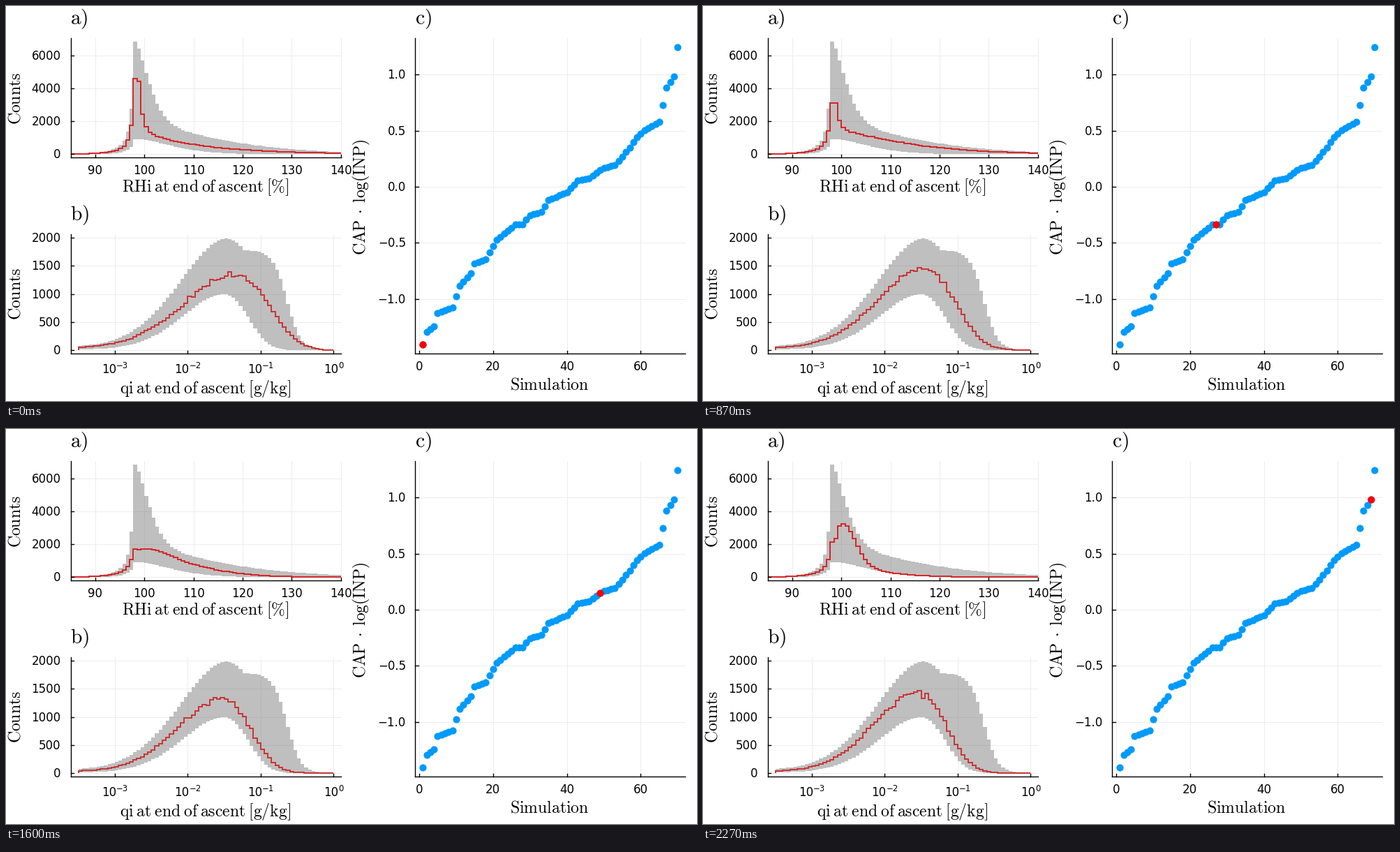
Recreate the animation shown at these times as a matplotlib script. Size 990 px wide and 566 px high, loop 2.34 s.

```python
import numpy as np
import matplotlib.pyplot as plt
from matplotlib.animation import FuncAnimation
from matplotlib.collections import LineCollection

plt.rcParams["mathtext.fontset"] = "cm"
plt.rcParams["font.family"] = "DejaVu Sans"

W, H, DPI = 990, 566, 100
PX = 72 / DPI            # points per pixel
STEPS, TICK_MS, LOOP_MS = 35, 10, 2340

fig = plt.figure(figsize=(W / DPI, H / DPI), dpi=DPI, facecolor="white")
ax = fig.add_axes([0, 0, 1, 1])
ax.set_xlim(0, W)
ax.set_ylim(H, 0)
ax.axis("off")


# ---- scales, all in stage pixels ----
def rh_x(v):
    return 198.3 + 7.03 * (v - 100)


def rh_y(n):
    return 212.2 - 0.02353 * n


def qi_x(e):
    return 469.2 + 104.4 * e


def qi_y(n):
    return 493.2 - 0.0806 * n


def sim_x(s):
    return 592 + 5.29 * s


def cap_y(v):
    return 258.9 - 160.7 * v


# ---- histogram shapes ----
RH_BINS = np.arange(74) - 17.0       # bin 0 is where the spike starts
QI_BINS = np.arange(70.0)


def decay(d, scale, power):
    return np.exp(-(np.maximum(d, 0) / scale) ** power)


def rise(tail, steep, tail_len=3.6):
    """Growth from the left up to the spike."""
    u = np.minimum(RH_BINS + 1, 0)
    return tail * np.exp(u / tail_len) + steep * np.exp(u / 0.8)


def spiked(left, right):
    return np.where(RH_BINS < 0, left, right)


def rh_counts_at(spike, broad, scale, power, hump):
    right = broad * decay(RH_BINS, scale, power)
    right += spike * decay(RH_BINS - 1, 1, 1)
    centre = 6 - hump / 700
    right += hump * np.exp(-((RH_BINS - centre) / 300) ** 2 / 2 * 90 ** 2)
    return spiked(rise(700, 350 + 0.24 * max(spike, 0)), right)


def bell(peak, centre, left, right, base):
    """Skewed bell with its own width on each side and a fading base."""
    shape = decay(centre - QI_BINS, left, 1.85) * decay(QI_BINS - centre, right, 2.4)
    return peak * shape + base * (1 - QI_BINS / 70)


RH_TOP = spiked(rise(1200, 1560),
                4850 * decay(RH_BINS, 5, 1.5) + 2000 * decay(RH_BINS, 27, 1.4))
RH_LOW = spiked(rise(430, 0, 2), 920 * decay(RH_BINS, 13.5, 1.7))
QI_TOP = np.maximum(bell(1960, 40, 18.3, 12.3, 50),
                    np.where(QI_BINS > 40, 1780 / (1 + np.exp((QI_BINS - 56.7) / 1.9)), 0))
QI_LOW = bell(990, 39, 15.7, 9.2, 10)

# how the shapes drift over the loop
KEYS = [0, 5, 10, 16, 21, 28, 34]


def drift(*values):
    return np.interp(np.arange(STEPS), KEYS, values)


spike = drift(3050, 3100, 2350, 820, 150, -200, -1000)
broad = drift(1500, 1400, 1500, 1480, 1620, 1650, 1800)
scale = drift(17, 27, 23.5, 23.5, 20.5, 17, 9)
power = drift(1, 1.2, 1.3, 1.4, 1.9, 1.5, 1.1)
hump = drift(0, 0, 0, 0, 0, 450, 2040)
peak = drift(1330, 1500, 1450, 1400, 1310, 1300, 1430)
centre = drift(42, 41, 41, 38.5, 38, 39, 38)
right = drift(13, 13, 12.2, 12, 11.5, 10.5, 11)

rng = np.random.default_rng(4)


def sampled(curve, low, top, noise):
    grain = 1 + noise * rng.standard_normal(curve.size)
    return np.clip(curve * grain, low, top)


rh_all = [sampled(rh_counts_at(*p), RH_LOW, RH_TOP, 0.01)
          for p in zip(spike, broad, scale, power, hump)]
qi_all = [sampled(bell(p, c, 16.5 + 0.75 * (c - 38), r, 30), QI_LOW, QI_TOP, 0.02)
          for p, c, r in zip(peak, centre, right)]

rh_edges = np.clip(rh_x(85 + 0.75 * np.arange(75)), 92.9, 479.5)
qi_edges = qi_x(-3.5 + 0.05 * np.arange(71))

# sorted score of each simulation, through its main bends
BENDS = [(1, -1.41), (2, -1.295), (4, -1.245), (5, -1.13), (9, -1.075), (11, -0.885),
         (14, -0.77), (15, -0.683), (18, -0.645), (21, -0.475), (26, -0.338),
         (28, -0.335), (30, -0.255), (33, -0.226), (35, -0.12), (40, -0.048),
         (43, 0.054), (46, 0.076), (50, 0.17), (53, 0.19), (57, 0.35), (59, 0.44),
         (61, 0.502), (65, 0.576), (67, 0.882), (69, 0.981), (70, 1.243)]
sims = np.arange(1, 71)
dot_x = sim_x(sims)
dot_y = cap_y(np.interp(sims, *zip(*BENDS)))


# ---- static drawing ----
def stairs(edges, values):
    return np.repeat(edges, 2)[1:-1], np.repeat(values, 2)


def label(x, y, s, size=16.6, **kw):
    kw = {"ha": "center", "va": "baseline", **kw}
    ax.text(x, y, s, fontsize=size * PX, color="black",
            rotation_mode="anchor", **kw)


def signed(s):
    return s.replace("-", "\u2212")


def panel(left, right, top, bottom, xs, ys):
    grid = [[(x, top), (x, bottom)] for x in xs]
    grid += [[(left, y), (right, y)] for y in ys]
    ax.add_collection(LineCollection(grid, colors="#ececec", linewidths=PX, zorder=1))
    axes = [[(x, bottom), (x, bottom - 4.5)] for x in xs]
    axes += [[(left, y), (left + 4.5, y)] for y in ys]
    axes += [[(left, top), (left, bottom)], [(left, bottom), (right, bottom)]]
    ax.add_collection(LineCollection(axes, colors="black", linewidths=1.4 * PX,
                                     capstyle="projecting", zorder=5))


def band(edges, low, top, to_y):
    x, lo = stairs(edges, to_y(low))
    _, hi = stairs(edges, to_y(top))
    ax.fill_between(x, lo, hi, color="#808080", alpha=0.5, linewidth=0, zorder=2)


rh_ticks = range(90, 141, 10)
rh_counts = range(0, 6001, 2000)
panel(92.5, 480, 46, 217, [rh_x(v) for v in rh_ticks], [rh_y(n) for n in rh_counts])
for v in rh_ticks:
    label(rh_x(v), 241, str(v))
for n in rh_counts:
    label(78.5, rh_y(n) + 6, str(n), ha="right")

qi_ticks = range(-3, 1)
qi_counts = range(0, 2001, 500)
panel(92.5, 480, 327, 498, [qi_x(e) for e in qi_ticks], [qi_y(n) for n in qi_counts])
for e in qi_ticks:
    start = qi_x(e) - (19 if e else 14)
    label(start, 526.5, "10", ha="left")
    label(start + 21.2, 519, signed(str(e)), 11.6, ha="left")
for n in qi_counts:
    label(78.5, qi_y(n) + 6, str(n), ha="right")

sim_ticks = range(0, 61, 20)
cap_ticks = np.arange(-2, 3) / 2
panel(586, 973, 46, 498, [sim_x(s) for s in sim_ticks], [cap_y(v) for v in cap_ticks])
for s in sim_ticks:
    label(sim_x(s), 522, str(s))
for v in cap_ticks:
    label(573, cap_y(v) + 6, signed(f"{v:.1f}"), ha="right")

GUIDE, TITLE = 23.7, 29.5
GAP = r"\hspace{0.23}"


def guide(words):
    return "$" + GAP.join(r"\mathrm{%s}" % w for w in words.split()) + "$"


label(285.5, 266, guide(r"RHi at end of ascent [\%]"), GUIDE)
label(285, 555, guide("qi at end of ascent [g/kg]"), GUIDE)
label(778.5, 550, guide("Simulation"), GUIDE)
for y in (132.5, 413):
    label(20.5, y, guide("Counts"), GUIDE, rotation=90)
label(515, 273.5, r"$\mathrm{CAP}" + GAP + r"\cdot" + GAP + r"\mathrm{log(INP)}$",
      GUIDE, rotation=90)
for x, y, s in ((91.5, 25.5, "a)"), (91.5, 307, "b)"), (585.5, 25.5, "c)")):
    label(x, y, guide(s), TITLE, ha="left")

band(rh_edges, RH_LOW, RH_TOP, rh_y)
band(qi_edges, QI_LOW, QI_TOP, qi_y)
DOT = 10.2 * PX
ax.scatter(dot_x, dot_y, s=DOT ** 2, c="#009afa", linewidths=0, zorder=6)

# ---- moving parts ----
line_style = {"lw": 2 * PX, "solid_joinstyle": "miter", "solid_capstyle": "butt"}
rh_line, = ax.plot([], [], color="#d62728", zorder=4, **line_style)
qi_line, = ax.plot([], [], color="#c83737", zorder=4, **line_style)
marker, = ax.plot([], [], "o", color="#ff0000", ms=DOT, mew=0, zorder=7)


def update(tick):
    step = min((3 * tick + 1) // 20, STEPS - 1)    # 15 steps per second
    x, n = stairs(rh_edges, rh_all[step])
    rh_line.set_data(x, rh_y(n))
    x, n = stairs(qi_edges, qi_all[step])
    qi_line.set_data(np.r_[x[0], x, x[-1]], qi_y(np.r_[0, n, 0]))
    sim = 2 * step
    marker.set_data([dot_x[sim]], [dot_y[sim]])
    return rh_line, qi_line, marker


anim = FuncAnimation(fig, update, frames=LOOP_MS // TICK_MS, interval=TICK_MS,
                     repeat=True, repeat_delay=0, blit=False)
plt.show()
```
